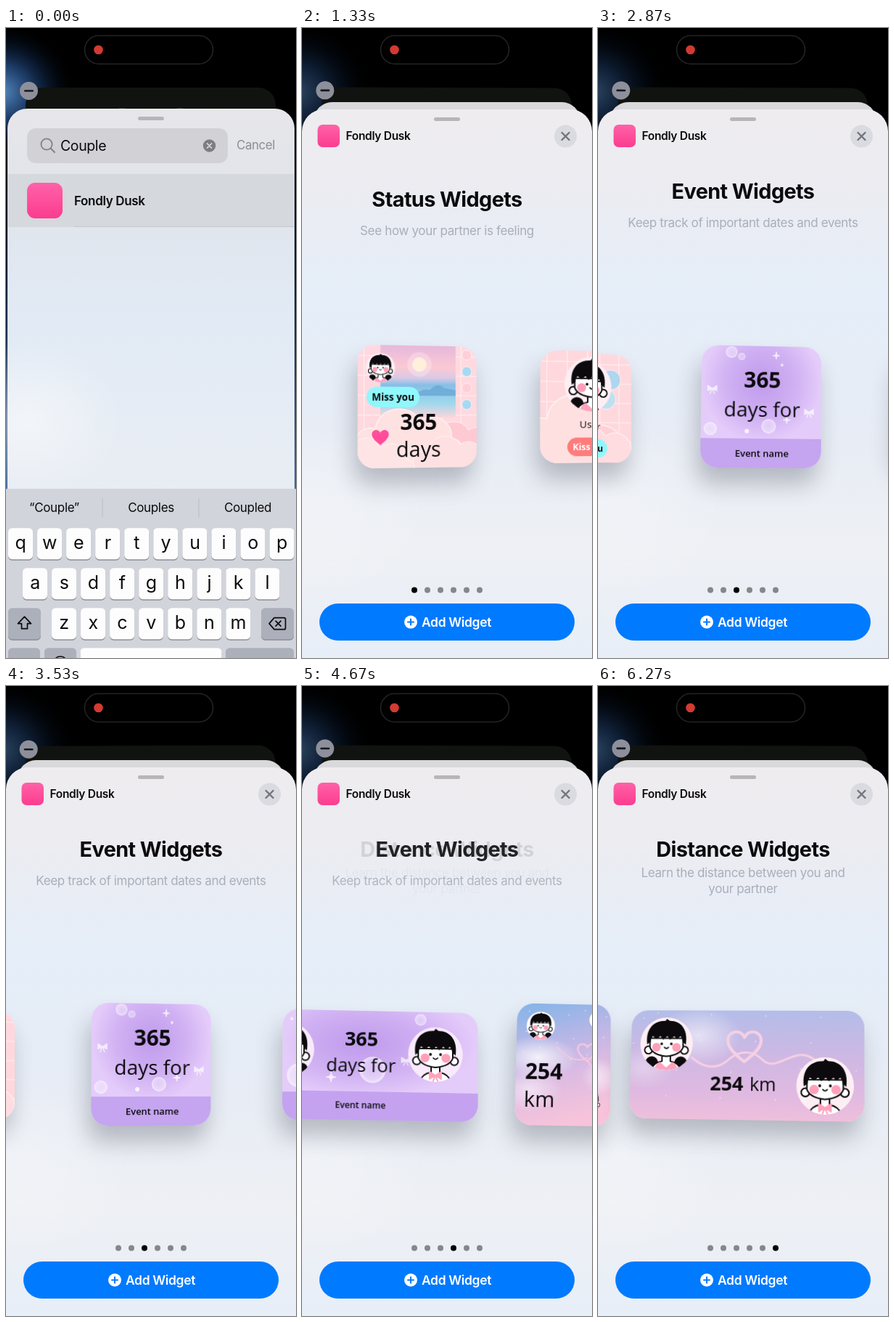
Animation of 400 by 867 pixels, one loop 6.34 s. Source, as an HTML page:

```html
<!DOCTYPE html>
<html lang="en">
<head>
<meta charset="utf-8">
<title>Widget gallery</title>
<style>
  html, body { margin: 0; width: 100%; height: 100%; overflow: hidden; background: #000; }
  #stage { position: relative; width: 400px; height: 867px; overflow: hidden; background: #000; }
  #stage svg { position: absolute; left: 0; top: 0; display: block; }
  #sheet { position: absolute; left: 0; top: 0; width: 400px; height: 867px; }
  text { font-family: Inter, "Liberation Sans", sans-serif; letter-spacing: -.02em; }
  .card text { font-family: "Open Sans", "Noto Sans", sans-serif; letter-spacing: 0; }
  #stage .card { overflow: hidden; border-radius: 23px; box-shadow: -5px 22px 30px rgba(45, 50, 65, .28); }
</style>
</head>
<body>
<div id="stage">
  <svg id="home" width="400" height="867"></svg>
  <div id="sheet"><svg id="panel" width="400" height="867"></svg></div>
  <svg id="keys" width="400" height="867"></svg>
</div>
<script>
const LOOP = 6340;
const $ = id => document.getElementById(id);

// Drawing helpers
const rect = (x, y, w, h, fill, r = 0, more = '') =>
  `<rect x="${x}" y="${y}" width="${w}" height="${h}" rx="${r}" fill="${fill}" ${more}/>`;
const dot = (x, y, r, fill, more = '') => `<circle cx="${x}" cy="${y}" r="${r}" fill="${fill}" ${more}/>`;
const path = (d, fill, stroke = 'none', w = 1, more = '') =>
  `<path d="${d}" fill="${fill}" stroke="${stroke}" stroke-width="${w}" stroke-linecap="round" stroke-linejoin="round" ${more}/>`;
const text = (s, x, y, size, weight = 400, fill = '#0b0b0d', anchor = 'middle') =>
  `<text x="${x}" y="${y}" font-size="${size}" font-weight="${weight}" fill="${fill}" text-anchor="${anchor}">${s}</text>`;
const group = (x, y, scale, body) => `<g transform="translate(${x} ${y}) scale(${scale})">${body}</g>`;
const stops = list => list.map(([at, color, alpha = 1]) =>
  `<stop offset="${at}" stop-color="${color}" stop-opacity="${alpha}"/>`).join('');
const linear = (id, list, x2 = 0, y2 = 1) =>
  `<linearGradient id="${id}" x1="0" y1="0" x2="${x2}" y2="${y2}">${stops(list)}</linearGradient>`;
const radial = (id, list, cy = .5) => `<radialGradient id="${id}" cy="${cy}">${stops(list)}</radialGradient>`;
const repeat = (n, fn) => Array.from({ length: n }, (_, i) => fn(i)).join('');

const defs = `<defs>
  ${radial('glow', [[0, '#5b8fc6'], [.4, '#234a80', .8], [.7, '#102a50', .35], [1, '#000', 0]])}
  ${radial('mist', [[0, '#fff', .8], [1, '#fff', 0]])}
  ${radial('bubble', [[0, '#fff', .25], [.75, '#fff', .4], [1, '#fff', .7]])}
  ${linear('edge', [[0, '#000'], [.3, '#0a1a33'], [.7, '#40699c'], [1, '#6c86a6']])}
  ${linear('search', [[0, '#e7e6ea'], [.14, '#e1e4ea'], [.35, '#e1eaf5'], [.6, '#e8edf4'], [1, '#e4ebf5']])}
  ${linear('sheetFill', [[0, '#eeecef'], [.13, '#ececf1'], [.32, '#e5eef9'], [.55, '#e7ecf5'], [.76, '#eef0f4'], [1, '#e6eef9']])}
  ${linear('icon', [[0, '#ff62a8'], [1, '#fb3c8f']])}
  ${linear('beach', [[0, '#e6b8dc'], [.3, '#fbc9d3'], [.45, '#d9c9e6'], [.55, '#86bfe6'], [.8, '#9fd8ec'], [1, '#fbd6dc']])}
  ${radial('lilac', [[0, '#bf9aec'], [.6, '#d1b2f3'], [1, '#e4ccfa']], .3)}
  ${linear('dusk', [[0, '#83b4e8'], [.35, '#b6b6e6'], [.65, '#dcbbe3'], [1, '#f6c3da']], .25)}
  ${linear('haze', [[0, '#b3bde8'], [.4, '#cdb8e4'], [.75, '#dfb9e1'], [1, '#efbfdc']])}
  <clipPath id="round"><circle r="38"/></clipPath>
</defs>`;

const heart = (x, y, scale, fill, stroke = 'none') => group(x, y, scale,
  path('M0 10C-8 4-11 0-11-4C-11-10-3-12 0-6C3-12 11-10 11-4C11 0 8 4 0 10Z', fill, stroke, 2));

const ink = '#0c0a0d';
const outline = `stroke="${ink}" stroke-width="2"`;
const pair = fn => fn(-1) + fn(1);
const avatar = (x, y, r, pigtails, backdrop = '#fdeef4') => group(x, y, r / 38,
  dot(0, 0, 38, backdrop) + '<g clip-path="url(#round)">' +
  (pigtails ? pair(s => `<ellipse cx="${s * 21}" cy="27" rx="9" ry="9" fill="${ink}"/>`) : '') +
  path('M-23 42Q-20 27-6 25V15H6V25Q20 27 23 42', '#fff', ink, 2) +
  (pigtails ? path('M-17 42Q-17 29-9 26L0 34L9 26Q17 29 17 42Z', '#ffa3bd')
            : path('M0 29L-8 24V34ZM0 29L8 24V34ZM0 29L-4 39M0 29L4 39', '#ffa3bd', '#ffa3bd', 2)) +
  pair(s => dot(s * 26, 9, 5.5, '#fff', outline)) +
  path('M-24-8V5Q-20 16 0 18Q20 16 24 5V-8Z', '#fff', ink, 2) +
  pair(s => dot(s * 14.5, 5, 6.2, '#ff9fb9') + dot(s * 7, 0, 1.9, ink)) +
  path('M-3 5Q0 8.5 3 5', 'none', ink, 1.7) +
  path('M-28 1C-31-20-21-33-2-33L0-36L4-33C21-33 31-20 28 1L23-3Q23-8 20-11L15-7L11-11L5-6L1-11L-5-6L-9-11L-15-7L-20-11Q-23-8-23-3Z', ink) +
  '</g>');

const pill = (x, y, w, h, fill, label, size, color) =>
  rect(x, y, w, h, fill, h / 2) + text(label, x + w / 2, y + h / 2 + size * .36, size, 700, color);
const bubbles = list => list.map(([x, y, r]) => dot(x, y, r, 'url(#bubble)')).join('');
const star = (x, y, r) => path(`M${x} ${y - r}Q${x} ${y} ${x + r} ${y}Q${x} ${y} ${x} ${y + r}Q${x} ${y} ${x - r} ${y}Q${x} ${y} ${x} ${y - r}Z`, '#fff', '#fff', 1, 'opacity=".75"');
const bow = (x, y) => path(`M${x} ${y}l-6-4v7zl6-4v7zl-3 7m3-7l3 7`, '#fff', '#fff', 1.5, 'opacity=".7"');
const mist = (x, y, rx, ry, alpha = 1) => `<ellipse cx="${x}" cy="${y}" rx="${rx}" ry="${ry}" fill="url(#mist)" opacity="${alpha}"/>`;
const cloud = (x, y, s, fill) => group(x, y, s,
  path('M-60 50C-75 20-55 0-38 6C-35-22 5-28 18-4C38-18 62 0 58 18C76 20 76 40 70 50Z', fill, '#fff3f2', 1.2));
const grid = (w, h) => repeat(Math.ceil(w / 27), i => rect(8 + i * 27, 0, 1.2, h, '#ffedef')) +
  repeat(Math.ceil(h / 27), i => rect(0, 14 + i * 27, w, 1.2, '#ffedef'));
const specks = (n, w, h) => repeat(n, i => dot((i * 61.8 + 17) % w, (i * 37.3 + 11) % h, .8, '#fff', 'opacity=".8"'));
const sea = (x, y, w) => path(`M${x} ${y}q${w * .2}-8 ${w * .35}-5q${w * .2}-12 ${w * .35}-3l${w * .3} 3v8h${-w}z`, '#69a8d6', 'none', 0, 'opacity=".8"');

const small = { w: 166, h: 168, step: 270 };
const medium = { w: 323, h: 151, step: 345 };
const cards = [
  { ...small, body:
    rect(0, 0, 166, 168, '#ffd9df') + grid(166, 168) + rect(31, 0, 105, 99, 'url(#beach)') +
    dot(85, 26, 17, '#fff', 'opacity=".25"') + dot(85, 26, 10, '#fff0dc') + sea(80, 66, 56) +
    repeat(4, i => dot(152, 12 + i * 23, 7, i % 2 ? '#a7daf0' : '#ffcfd8', 'stroke="#fff0f2"')) +
    cloud(140, 120, .8, '#ffc9d4') + cloud(66, 108, 1.1, '#fee2e2') + cloud(128, 140, .8, '#fee0e2') + cloud(20, 142, .8, '#ffe4e5') +
    avatar(31, 31, 20, true) + pill(12, 57, 73, 28, '#90f7fb', 'Miss you', 13.5, ink) +
    heart(31, 126, 1.05, '#ff4d9b') + text('365', 84, 116, 30, 700) + text('days', 84, 153, 29, 500) },
  { ...medium, body:
    rect(0, 0, 323, 151, '#ffd8dd') + grid(323, 151) + rect(80, 0, 180, 100, 'url(#beach)') + sea(105, 46, 140) +
    dot(294, 36, 14, '#aed6ee', 'stroke="#fff0f2"') + dot(287, 63, 14, '#bfe0f0', 'stroke="#fff0f2"') +
    cloud(240, 110, 1.2, '#ffd0d6') + cloud(150, 98, 1.25, '#fedfe1') + cloud(60, 84, 1.35, '#fee0e1') + cloud(270, 118, .9, '#ffdcdf') +
    avatar(69, 45, 37, true) + avatar(258, 46, 37, false) +
    text('365', 162, 54, 27, 700) + heart(162, 75, .9, '#ff4d9b') + text('days', 162, 113, 26, 500) +
    text('User', 67, 104, 13.5) + text('Partner', 256, 106, 13.5) +
    pill(36, 117, 60, 25, '#ff7c7c', 'Kiss me', 12, '#fff') + pill(224, 119, 65, 25, '#90f7fb', 'Miss you', 12.2, ink) },
  { ...small, body:
    rect(0, 0, 166, 168, 'url(#lilac)') + bubbles([[41, 9, 8], [55, 15, 5], [13, 115, 9], [93, 111, 10]]) +
    star(103, 13, 5) + star(118, 102, 5) + star(111, 26, 2) + bow(15, 60) + bow(149, 91) + dot(63, 118, 3, '#fff', 'opacity=".8"') +
    rect(0, 128, 166, 40, '#c5a4f0') + text('365', 84, 58, 30, 700) + text('days for', 84, 98, 28, 500) + text('Event name', 84, 153, 13, 600) },
  { ...medium, body:
    rect(0, 0, 323, 151, 'url(#lilac)') + bubbles([[243, 11, 8], [22, 90, 16], [177, 82, 18]]) +
    star(120, 93, 7) + star(32, 2, 3) + bow(223, 68) + star(12, 14, 2) +
    avatar(58, 56, 38, true, '#f8eafb') + avatar(264, 59, 38, false, '#f8eafb') +
    rect(0, 112, 323, 40, '#c5a2f0') + text('365', 161, 49, 27, 700) + text('days for', 161, 85, 25.5, 500) + text('Event name', 161, 135, 12.2, 600) },
  { ...small, body:
    rect(0, 0, 166, 168, 'url(#dusk)') + mist(30, 75, 55, 30) + mist(135, 100, 45, 28) + mist(20, 120, 45, 30, .7) + specks(20, 166, 90) +
    path('M117 9a13 13 0 1 0 9 16a11 11 0 0 1-9-16z', '#fffdf4') +
    path('M56 60Q80 85 98 74M98 78Q112 100 132 108', 'none', '#f8c6de', 1.8) + heart(98, 67, 1.2, 'none', '#f8c6de') +
    avatar(33, 31, 19.5, true, '#fff') + avatar(136, 134, 19, false, 'none') +
    text('254', 13, 105, 30, 700, ink, 'start') + text('km', 12, 143, 29, 500, ink, 'start') },
  { ...medium, body:
    rect(0, 0, 323, 151, 'url(#haze)') + mist(95, 35, 60, 40, .7) + mist(20, 80, 45, 30, .4) + specks(18, 323, 151) +
    path('M86 66C110 86 128 78 140 66C155 55 172 56 184 68C205 88 228 45 256 68', 'none', '#f6cfe2', 3) +
    heart(159, 50, 2.1, 'none', '#f6cfe2') +
    avatar(50, 47, 37, true) + avatar(270, 103, 39, false) +
    text('254', 112, 111, 27, 700, ink, 'start') + text('km', 167, 111, 25, 500, ink, 'start') },
];

const appName = 'Fondly Dusk';
const grabber = y => rect(182, y, 36, 5, '#b6b5ba', 2.5);

$('home').innerHTML = defs +
  rect(0, 0, 400, 867, '#000') + rect(0, 110, 400, 757, 'url(#edge)') +
  '<ellipse id="light" cx="-8" cy="88" rx="105" ry="95" fill="url(#glow)"/>' +
  `<g id="jiggle">${rect(27, 82, 345, 160, '#10130f', 24)}
    ${dot(160, 127, 17, '#34383a')}${dot(240, 127, 17, '#34383a')}
    ${dot(31.5, 86.5, 12.5, '#8d909b')}${rect(25, 85.2, 13, 2.6, '#15171c', 1.3)}</g>` +
  rect(108.5, 10.5, 177, 39, '#000', 19.5, 'stroke="#242426" stroke-width="1.5"') + dot(127.5, 30, 6.3, '#d23b32') +
  `<g id="back">${rect(2, 111, 396, 800, 'url(#search)', 27)}${mist(30, 540, 130, 110, .6)}
    ${grabber(122)}${rect(29, 138, 277, 48, '#d2d2d6', 12)}
    ${dot(56, 160, 7.6, 'none', 'stroke="#828287" stroke-width="1.8"')}${path('M61.5 165.5L67 171', 'none', '#828287', 2)}
    ${text('Couple', 75, 169, 19.5, 400, '#0b0b0d', 'start')}
    ${dot(280.5, 162, 8.7, '#7d7d82')}${path('M277.5 159l6 6m0-6l-6 6', 'none', '#e4e4e8', 1.6)}
    ${text('Cancel', 318, 167.5, 16.8, 400, '#8c8c91', 'start')}
    ${rect(2, 201, 396, 73, '#d5d8dc')}${rect(94, 273, 304, 1, '#c6c9ce')}
    ${rect(29, 213, 49, 49, 'url(#icon)', 11)}${text(appName, 94, 244, 17, 600, '#0b0b0d', 'start')}
    <rect id="dim" x="2" y="111" width="396" height="800" rx="27" fill="#000"/></g>`;

const heading = (id, title, y, lines, lineY) => `<g id="${id}">${text(title, 200, y, 28.8, 700)}
  ${lines.map((line, i) => text(line, 200, lineY + i * 22.5, 17, 400, '#a9afba')).join('')}</g>`;

$('panel').innerHTML =
  rect(0, 112, 400, 800, 'url(#sheetFill)', 30) + mist(10, 660, 170, 130, .35) + grabber(123) +
  rect(21.5, 133, 30.5, 31, 'url(#icon)', 7) + text(appName, 60.5, 154, 15.5, 600, '#0b0b0d', 'start') +
  dot(363.5, 149, 15.5, '#dadbe0') + path('M358.5 144l10 10m0-10l-10 10', 'none', '#737479', 2.4) +
  heading('title0', 'Status Widgets', 246, ['See how your partner is feeling'], 285) +
  heading('title1', 'Event Widgets', 234.5, ['Keep track of important dates and events'], 273.5) +
  heading('title2', 'Distance Widgets', 234.5, ['Learn the distance between you and', 'your partner'], 262.5) +
  `<g id="dots">${repeat(6, i => dot(155 + i * 18, 773.5, 4, '#86868b'))}</g>` +
  rect(24, 792, 352, 51, '#007aff', 25.5) + dot(150, 817.5, 9, '#fff') +
  path('M146 817.5h8m-4-4v8', 'none', '#007aff', 2) + text('Add Widget', 165, 823.7, 17.5, 600, '#fff', 'start');

for (const card of cards) {
  $('sheet').insertAdjacentHTML('beforeend',
    `<svg class="card" width="${card.w}" height="${card.h}" style="left:${200.5 - card.w / 2}px;top:${521 - card.h / 2}px">${card.body}</svg>`);
  card.el = $('sheet').lastElementChild;
}

const key = (x, y, w, fill, label = '') => rect(x, y + 1.5, w, 43, '#8b8e95', 5.5) + rect(x, y, w, 43, fill, 5.5) +
  text(label, x + w / 2, y + 28.5, 25);
const keyRow = (letters, x, y) => [...letters].map((c, i) => key(x + i * 40.05, y, 34, '#fdfdfe', c)).join('');
const grey = '#abb0ba';
$('keys').innerHTML = rect(0, 633, 400, 346, '#d1d4da') +
  ['“Couple”', 'Couples', 'Coupled'].map((w, i) => text(w, 66.5 + i * 133.5, 665, 17)).join('') +
  rect(132.5, 646, 1, 26, '#b9bcc3') + rect(265.5, 646, 1, 26, '#b9bcc3') +
  keyRow('qwertyuiop', 3, 687) + keyRow('asdfghjkl', 23, 742) + keyRow('zxcvbnm', 63, 797) +
  key(3, 797, 45, grey) + key(352, 797, 45, grey) +
  path('M25.5 809l-9 9.5h5v7h8v-7h5z', 'none', '#0b0b0d', 1.7) +
  path('M370 810.5h13.5q2 0 2 2v12q0 2-2 2h-13.5l-7-8zM372 815l7 7m0-7l-7 7', 'none', '#0b0b0d', 1.7) +
  key(3, 852, 44, grey) + key(53, 852, 44, grey) + key(102.5, 852, 195, '#fdfdfe') + key(303, 852, 94, grey) +
  dot(75, 873, 9.5, 'none', 'stroke="#0b0b0d" stroke-width="1.6"');

// Motion
const clamp = v => Math.min(1, Math.max(0, v));
const spring = ms => {
  const x = Math.max(0, ms) * .0093;
  return 1 - (1 + x) * Math.exp(-x);
};
const swipes = [1257, 2440, 3560, 4540, 5560];
// time, then tilt about x, y and z in degrees
const tilts = [[0, 3, 4, .4], [1330, 1, 9, 0], [2400, 6, 2, .7], [3530, .5, 7, .2], [4130, 5.5, 0, .7], [5270, 5, 3, 1.3], [6270, 4, -4, .8], [LOOP, 4, -4, .8]];

function tiltAt(t) {
  const i = tilts.findIndex(row => row[0] > t);
  const [a, b] = [tilts[i - 1], tilts[i]];
  const u = (t - a[0]) / (b[0] - a[0]);
  const s = u * u * (3 - 2 * u);
  return [1, 2, 3].map(k => a[k] + (b[k] - a[k]) * s);
}

const opened0 = spring(60);
function draw(t) {
  const opened = spring(t + 60);
  const pushed = (opened - opened0) / (1 - opened0);
  $('back').setAttribute('transform',
    `translate(200 ${111 - 9 * pushed}) scale(${1 - .073 * pushed}) translate(-200 -111)`);
  $('dim').setAttribute('opacity', .06 * pushed);
  $('light').setAttribute('opacity', 1 - .5 * pushed);
  $('jiggle').setAttribute('transform', `rotate(${.25 * Math.sin(t / 41)} 200 160)`);
  $('sheet').style.transform = `translateY(${755 * (1 - opened)}px)`;
  $('keys').style.transform = `translateY(${346 * (spring(t + 120) - spring(120))}px)`;

  const page = swipes.reduce((sum, start) => sum + spring(t - start), 0);
  const [rx, ry, rz] = tiltAt(t);
  cards.forEach((card, i) => {
    const away = i - page;
    card.el.style.visibility = Math.abs(away) < 1.6 ? 'visible' : 'hidden';
    card.el.style.transform =
      `translateX(${away * card.step}px) perspective(800px) rotateZ(${rz}deg) rotateX(${rx}deg) rotateY(${ry}deg)`;
  });

  const toEvent = clamp((page - 1.3) / .4), toDistance = clamp((page - 3.3) / .4);
  [1 - toEvent, toEvent * (1 - toDistance), toDistance].forEach((o, i) => $('title' + i).setAttribute('opacity', o));
  const current = Math.round(page);
  [...$('dots').children].forEach((el, i) => el.setAttribute('fill', i === current ? '#000' : '#86868b'));
}

const begin = performance.now();
function tick() {
  draw((performance.now() - begin) % LOOP);
  requestAnimationFrame(tick);
}
draw(0);
requestAnimationFrame(tick);
</script>
</body>
</html>
```
